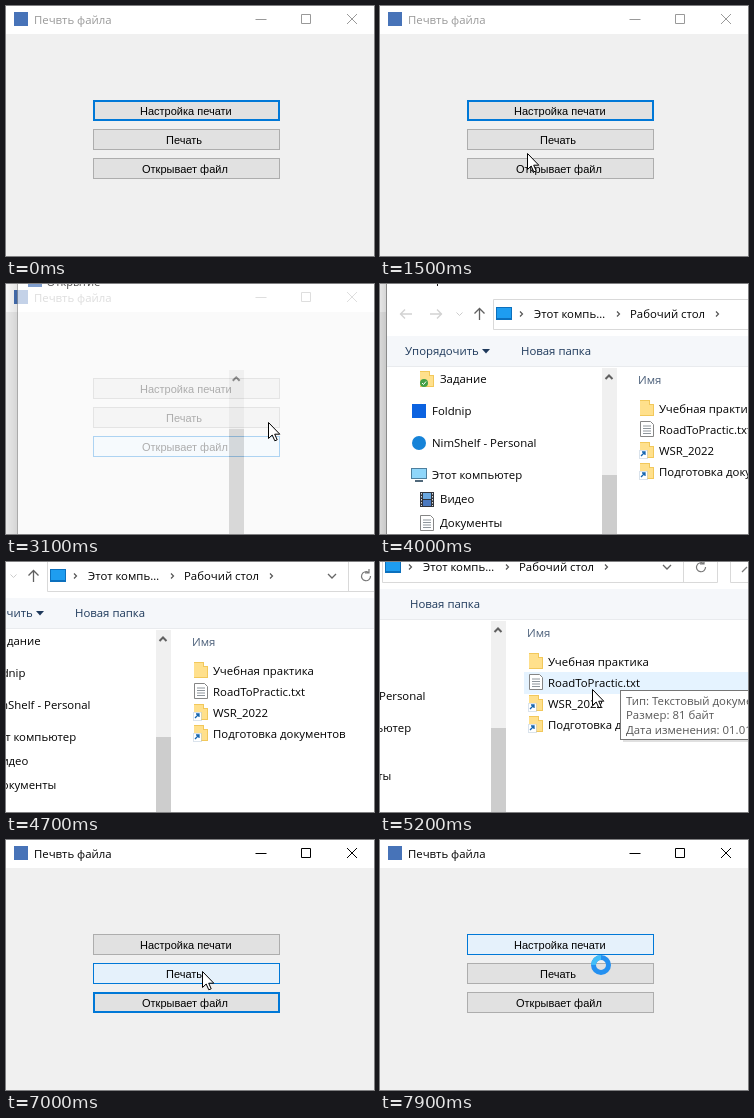
Animation, 368 px wide and 250 px high, one loop 8 s. Source, as an HTML page:

```html
<!DOCTYPE html>
<html lang="ru">
<head>
<meta charset="utf-8">
<title>Печать файла</title>
<style>
html, body { margin: 0; width: 100%; height: 100%; overflow: hidden; background: #f0f0f0; }
svg { display: block; width: 368px; height: 250px; }
text { font: 11.4px "Open Sans", "Noto Sans", sans-serif; white-space: pre; }
.button text { font: 11px "Liberation Sans", Arial, sans-serif; }
.crisp { shape-rendering: crispEdges; }
.line { fill: none; stroke: currentColor; }
</style>
</head>
<body>
<svg id="stage" viewBox="0 0 368 250"></svg>
<script>
const LOOP = 8000, STEP = 100;
const stage = document.getElementById('stage');

const rect = (x, y, w, h, fill, more = '') =>
  `<rect class="crisp" x="${x}" y="${y}" width="${w}" height="${h}" fill="${fill}" ${more}/>`;
const label = (x, y, text, fill = '#000') => `<text x="${x}" y="${y}" fill="${fill}">${text}</text>`;
const line = (d, color = 'currentColor', width = 1, more = '') =>
  `<path class="line" d="${d}" style="stroke:${color}" stroke-width="${width}" ${more}/>`;
const at = (x, y, content) => `<g transform="translate(${x} ${y})">${content}</g>`;

const folder = '<path d="M0 0h10v4h4v12H0z" fill="#f2c85b"/><path d="M0 1h9v4h4v10H0z" fill="#ffe08c"/>';
const shortcut = folder + rect(-1, 8, 8, 8, '#fff', 'stroke="#b5c7da" stroke-width=".5"') +
  line('M1 14L5 10M2 10h3v3', '#1565b0', 1.3);
const synced = folder + '<circle cx="4" cy="12" r="4" fill="#43a047"/>' + line('M2 12l1.5 1.5L6 10.5', '#fff');
const sheet = '<path d="M.5.5h10l3 3v12H.5z" fill="#fff" stroke="#858585"/>' +
  line('M3 5h8M3 7.5h8M3 10h8M3 12.5h8', '#8f969c');
const screen = rect(0, 0, 16, 13, '#0c70bd') + rect(1, 1, 14, 10, '#1e9df0');
const computer = rect(0, 0, 16, 11, '#4d7f9e') + rect(1, 1, 14, 9, '#8fd6fa') + rect(4, 12, 8, 1.5, '#50687a');
const film = rect(0, 0, 14, 15, '#30343c') + rect(3, 1, 8, 6, '#6aa7df') + rect(3, 8, 8, 6, '#4a79c0') +
  line('M1.5 1v13M12.5 1v13', '#ddd', 1, 'stroke-dasharray="1.5 1.5"');

const buttons = [[94, 134, 'Настройка печати'], [123, 160, 'Печать'], [152, 136, 'Открывает файл']];
const files = [
  [folder, 'Учебная практика'], [sheet, 'RoadToPractic.txt'],
  [shortcut, 'WSR_2022'], [shortcut, 'Подготовка документов']
];

const mainWindow = `
  ${rect(0, 0, 368, 250, '#f0f0f0')}${rect(0, 0, 368, 28, '#fff')}
  ${rect(8, 6, 14, 14, '#4773b8')}
  <g id="caption">${label(28, 18, 'Печвть файла', 'currentColor')}
    ${line('M249.5 13.5h11M295.5 8.5h9v9h-9zM341 8l10 10M351 8l-10 10')}</g>
  ${buttons.map(([y, x, text]) =>
    `<g class="button">${rect(87.5, y + .5, 186, 20, '#e1e1e1')}${label(x, y + 15, text)}</g>`).join('')}`;

const addressBar = `
  ${line('M32 30H20M25 25.5L20.5 30l4.5 4.5M50 30h12M57 25.5l4.5 4.5-4.5 4.5', '#d2d2d2', 1.3)}
  ${line('M76.5 28.5l3 3 3-3', '#cccccc')}
  ${line('M99.5 36V24.5M94.5 29.5l5-5 5 5', '#606060', 1.3)}
  ${line('M113.5 15.5h335v30h-335zM414.5 16v29M600 15.5H461.5v30H600', '#d9d9d9')}
  ${line('M140 27.5l2.5 2.5-2.5 2.5M237 27.5l2.5 2.5-2.5 2.5M336 27.5l2.5 2.5-2.5 2.5', '#555', 1.2)}
  ${line('M394 28l4 4 4-4', '#666', 1.3)}
  ${line('M434.5 26.5A4.5 4.5 0 1 0 436.5 30M435 23v4h-4', '#777', 1.2)}
  ${line('M473 35l5-5', '#777', 1.2)}
  ${at(116, 23, screen)}${label(154, 34, 'Этот компь…')}${label(250, 34, 'Рабочий стол')}
  ${rect(7, 52, 600, 30, '#f5f7fa')}${rect(7, 82, 600, 1, '#e9ebee')}
  ${label(25, 71, 'Упорядочить', '#1e395b')}<path d="M102 65h8l-4 4.5z" fill="#1e395b"/>
  ${label(141, 71, 'Новая папка', '#1e395b')}`;

const tree = `
  ${at(40, 87, synced)}${label(60, 99, 'Задание')}
  ${rect(32, 120, 14, 14, '#0b62e0')}${label(52, 131, 'Foldnip')}
  <circle cx="39" cy="159" r="7" fill="#1683d8"/>${label(52, 163, 'NimShelf - Personal')}
  ${at(31, 184, computer)}${label(52, 195, 'Этот компьютер')}
  ${at(40, 208, film)}${label(60, 219, 'Видео')}
  ${at(40, 231, sheet)}${label(60, 243, 'Документы')}`;

const dialog = `
  ${rect(-10, -40, 16, 400, 'url(#shade)')}
  ${rect(6, -40, 700, 500, '#fff')}${rect(6, -40, 1, 500, '#8a8a8a')}
  ${rect(17, -13, 14, 13, '#4773b8')}${label(36, -1, 'Открытие')}
  <g id="address">${addressBar}</g>
  <g id="tree">${tree}</g>
  ${rect(222, 84, 15, 300, '#f0f0f0')}${line('M225.5 95l3.5-3.5 3.5 3.5', '#606060', 2)}
  ${rect(222, 191, 15, 250, '#cdcdcd', 'id="thumb"')}
  <g id="files">${label(258, 100, 'Имя', '#4c607a')}
    ${rect(255, 135, 400, 22, '#e5f3ff', 'id="row"')}
    ${files.map(([icon, text], i) => at(260, 116 + i * 21, icon) + label(279, 129 + i * 21, text)).join('')}</g>`;

const tooltip = `
  ${rect(243, 131, 130, 49, '#000', 'opacity=".12"')}
  ${rect(240.5, 128.5, 140, 49, '#fff', 'stroke="#767676"')}
  ${label(246, 143, 'Тип: Текстовый документ', '#575757')}
  ${label(246, 157, 'Размер: 81 байт', '#575757')}
  ${label(246, 172, 'Дата изменения: 01.01.2022 12:00', '#575757')}`;

stage.innerHTML = `
  <defs><linearGradient id="shade">
    <stop stop-opacity="0"/><stop offset="1" stop-opacity=".16"/></linearGradient></defs>
  ${mainWindow}<g id="dialog">${dialog}</g><g id="tooltip">${tooltip}</g>
  <path id="arrow" d="M.5.5V16.5L4.2 13 6.8 18.8 9.2 17.8 6.7 12.2H11.8Z" fill="#fff" stroke="#000"/>
  <g id="busy" fill="none" stroke-width="5">
    <circle r="7.5" stroke="#2490f0"/><path d="M-7.5 0A7.5 7.5 0 0 1 0 -7.5" stroke="#42bdf8"/></g>`;

const part = Object.fromEntries([...stage.querySelectorAll('[id]')].map(e => [e.id, e]));
const boxes = [...stage.querySelectorAll('.button rect')];

// Pointer keys: time, x, y
const pointerPath = [
  [100, 400, 130], [200, 334, 138], [600, 290, 172], [1000, 238, 188], [1100, 190, 165],
  [1200, 150, 141], [1300, 150, 141], [1400, 147, 145], [1500, 147, 147], [1800, 172, 163],
  [2200, 231, 165], [2300, 243, 165], [2600, 243, 165], [3100, 262, 138], [3600, 285, 122],
  [3900, 350, 198], [4000, 375, 190], [4800, 375, -30], [4900, 200, 48], [5000, 200, 48],
  [5100, 208, 112], [5200, 212, 127], [5900, 212, 127], [6100, 194, 118], [6500, 167, 129],
  [6800, 166, 127], [7100, 211, 133], [7200, 211, 133], [7300, 214, 122], [7400, 215, 108],
  [8000, 215, 108]
];

function pointerAt(t) {
  const next = pointerPath.findIndex(key => key[0] > t);
  if (next < 1) return [400, 130];
  const [t0, x0, y0] = pointerPath[next - 1], [t1, x1, y1] = pointerPath[next];
  const p = (t - t0) / (t1 - t0);
  return [Math.round(x0 + (x1 - x0) * p), Math.round(y0 + (y1 - y0) * p)];
}

const show = (element, visible) => element.setAttribute('display', visible ? 'inline' : 'none');
const paint = (element, attributes) => {
  for (const name in attributes) element.setAttribute(name, attributes[name]);
};

function styleButtons(t, x, y) {
  const focused = t >= 2500 && t < 7600 ? 2 : 0;
  const hovered = t >= 7400 ? 0 : t >= 2500 && t < 6000 ? 2 :
    buttons.findIndex(([top]) => x >= 87 && x < 274 && y >= top && y < top + 21);
  const pressed = t === 2500 || t === 7600;
  boxes.forEach((box, i) => {
    const hot = i === hovered, thick = i === focused && !hot ? 1 : 0;
    paint(box, {
      x: 87.5 + thick / 2, y: buttons[i][0] + .5 + thick / 2,
      width: 186 - thick, height: 20 - thick, 'stroke-width': 1 + thick,
      fill: hot ? (pressed ? '#cce4f7' : '#e5f1fb') : '#e1e1e1',
      stroke: hot && pressed ? '#005499' : hot || thick ? '#0078d7' : '#adadad'
    });
  });
}

function styleDialog(t, x, y) {
  show(part.dialog, t >= 3000 && t < 6100);
  const drag = Math.min(1, Math.max(0, (t - 4400) / 500));
  const ease = drag * drag * (3 - 2 * drag);
  const dx = Math.round(-111 * ease), dy = Math.round(-25 * ease);
  const opacity = t < 3100 ? .25 : t < 3200 ? .68 : t >= 6000 ? .35 : 1;
  const scale = t < 3100 ? .96 : t < 3200 || t >= 6000 ? .983 : 1;
  paint(part.dialog, {
    opacity,
    transform: `translate(${dx} ${dy}) translate(300 200) scale(${scale}) translate(-300 -200)`
  });
  show(part.address, t >= 3200);
  show(part.tree, t >= 3300);
  show(part.files, t >= 3400);
  part.thumb.setAttribute('y', t < 3400 ? 144 : 191);

  const row = Math.floor((y - dy - 114) / 21);
  show(part.row, x < 368 && x - dx >= 255 && row >= 0 && row < files.length);
  paint(part.row, {
    y: 114 + row * 21,
    fill: t >= 5600 ? '#cce8ff' : '#e5f3ff',
    stroke: t >= 5800 ? '#99d1ff' : 'none'
  });
  show(part.tooltip, t >= 5200 && t < 5600);
}

function render(now) {
  const t = Math.floor(now % LOOP / STEP) * STEP;
  const [x, y] = pointerAt(t), busy = t >= 7700;
  const active = t >= 2500 && t < 2900 || t >= 6000;
  part.caption.style.color = active ? '#000' : '#999';
  styleButtons(t, x, y);
  styleDialog(t, x, y);
  show(part.arrow, !busy);
  show(part.busy, busy);
  part.arrow.setAttribute('transform', `translate(${x} ${y})`);
  part.busy.setAttribute('transform', `translate(221 125) rotate(${(t - 7900) * .36})`);
}

const start = performance.now();
function tick() {
  render(performance.now() - start);
  requestAnimationFrame(tick);
}
tick();
</script>
</body>
</html>
```
